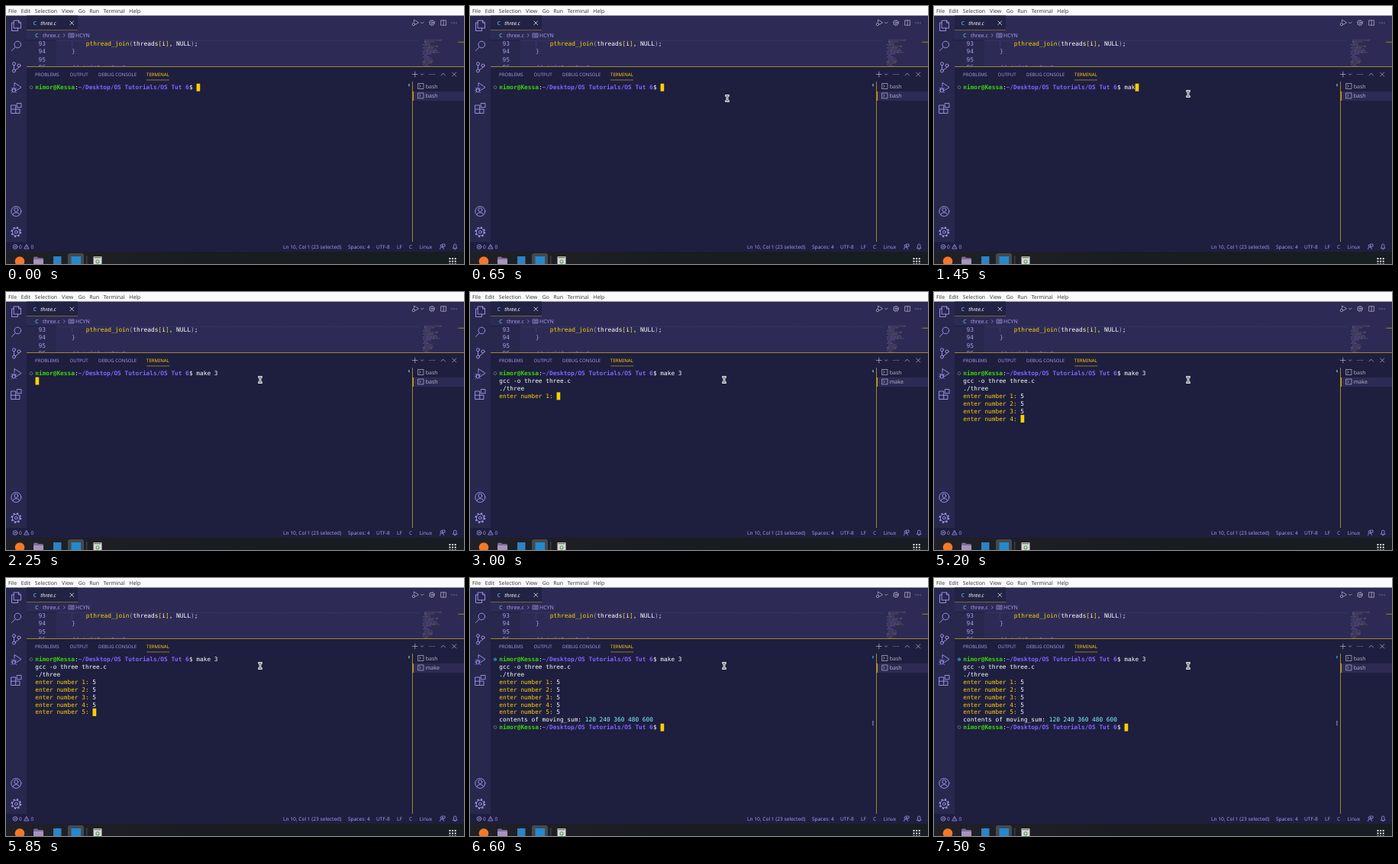
Write an HTML page that moves like this. It is 600 px wide and 338 px high and loops after 8000 ms.

```html
<!DOCTYPE html>
<html lang="en">
<head>
<meta charset="utf-8">
<title>Terminal session</title>
<style>
  html, body { margin: 0; width: 100%; height: 100%; overflow: hidden; background: #1e1e3f; }
  svg { display: block; width: 600px; height: 338px; }
  text { font: 6.6px "Noto Sans", "Open Sans", sans-serif; fill: #a599e9; white-space: pre; text-rendering: geometricPrecision; }
  .menu text { font-size: 6.9px; fill: #3c3c3c; }
  .tabs text { font-size: 6.1px; }
  .jobs text { font-size: 7px; fill: #b3aec4; }
  .mono text { font: 7.79px "DejaVu Sans Mono", monospace; fill: #fff; }
  .code text { font-size: 7.87px; }
  .mono .user { fill: #3ad900; font-weight: bold; }
  .mono .path { fill: #8066ff; font-weight: bold; }
  .mono .ask { fill: #fad000; }
  .mono .sum { fill: #80fcff; }
  .mono .soft { fill: #a599e9; }
  .mono .note { fill: #b362ff; }
  .icons { fill: none; stroke: #a599e9; stroke-width: .9; stroke-linejoin: round; stroke-linecap: round; }
  .small { stroke-width: .75; }
  .gray { stroke: #b3aec4; }
</style>
</head>
<body>
<svg viewBox="0 0 600 338" xmlns="http://www.w3.org/2000/svg">
  <defs>
    <linearGradient id="desk" x2="1" y2="0">
      <stop offset="0" stop-color="#202127"/><stop offset=".45" stop-color="#191c20"/><stop offset="1" stop-color="#171d20"/>
    </linearGradient>
    <linearGradient id="shade" x2="0" y2="1">
      <stop offset="0" stop-color="#15152d" stop-opacity=".5"/><stop offset="1" stop-color="#15152d" stop-opacity="0"/>
    </linearGradient>
    <clipPath id="editor"><path d="M27 44H600V79H27z"/></clipPath>
  </defs>

  <!-- window surfaces -->
  <path fill="#2d2b55" d="M27 12H600V79H27z"/>
  <path fill="#28284e" d="M0 12H27V309H0z"/>
  <path fill="#fafafa" d="M0 0H600V12.5H0z"/>
  <path fill="#222244" d="M27 12.5H94V32H27z"/>
  <path fill="#28284e" d="M27 44H66V79H27z"/>
  <path fill="#1e1e3f" d="M27 79H600V309H27z"/>
  <path fill="#1e1e3f" d="M0 309H600V322H0z"/>
  <path fill="url(#desk)" d="M0 322H600V338H0z"/>
  <path fill="#8d7a2c" d="M27 31.2H94V32H27z"/>

  <g class="menu" id="menu"></g>

  <!-- editor -->
  <g clip-path="url(#editor)">
    <path fill="#3a386b" d="M66 44H541V46H66z"/>
    <path fill="url(#shade)" d="M27 44H541V46H27z"/>
    <g class="mono code">
      <text class="soft" x="42.6" y="51.5">93</text>
      <text class="soft" x="42.6" y="62.4">94</text>
      <text class="soft" x="42.6" y="73.1">95</text>
      <text class="soft" x="42.6" y="83.4">96</text>
      <text x="104.8" y="51.5"><tspan class="ask">pthread_join</tspan><tspan class="soft">(</tspan>threads<tspan class="ask">[</tspan>i<tspan class="ask">]</tspan>, NULL<tspan class="soft">)</tspan>;</text>
      <text class="soft" x="86" y="62.4">}</text>
      <text class="note" x="86" y="83.4">// print output</text>
    </g>
    <path d="M86.5 46V54" stroke="#47447c" stroke-width=".5"/>
    <g id="map"></g>
    <path stroke="#a8922f" stroke-width=".9" d="M592.5 47.3H600"/>
  </g>
  <path fill="#9c882c" d="M27 79H600V80H27z"/>
  <text x="35.5" y="24.8" style="fill:#519aba;font-weight:bold;font-size:7px">C</text>
  <text x="45.3" y="24.8" style="fill:#fff;font-style:italic;font-size:6.8px">three.c</text>
  <text x="38" y="41.2" style="fill:#519aba;font-weight:bold;font-size:7px">C</text>
  <text x="48" y="41" style="font-size:7px">three.c</text>
  <text x="91" y="41" style="font-size:7px">HCYN</text>

  <!-- panel -->
  <g class="tabs" id="tabs"></g>
  <path fill="#c0a318" d="M184 96.6H214V97.3H184z"/>
  <path fill="#2d2b55" d="M533 112H600V124H533z"/>
  <path fill="#9c882c" d="M532 99H533V309H532z"/>
  <path fill="#c0a318" d="M533 112H534V124H533z"/>
  <g class="jobs">
    <text x="549.7" y="107.8">bash</text>
    <text id="job" x="549.7" y="120.3">bash</text>
  </g>

  <!-- activity bar -->
  <g class="icons">
    <path d="M10.5 19H16.5L19.5 22V29H10.5zM16.5 19V22H19.5M10.5 22H7.5V32.5H15.5V29"/>
    <circle cx="15.3" cy="50.5" r="4.3"/><path d="M12.2 53.7L7.5 58.6"/>
    <circle cx="10.5" cy="75.7" r="2"/><circle cx="17" cy="78" r="2"/><circle cx="10.5" cy="85" r="2"/>
    <path d="M10.5 77.8V83M17 80Q16.5 82 12.5 83.5"/>
    <path d="M11 105V100.5L20 106.5L14.5 110"/><ellipse cx="10.3" cy="110" rx="2.1" ry="3"/>
    <path class="small" d="M8.4 109H12.2M7 107.4L8.4 108.6M6.8 110.5H8.2M7 113.4L8.5 112.2M13.6 107.4L12.2 108.6M13.8 110.5H12.4M13.6 113.4L12.1 112.2"/>
    <path d="M7 130H12.7V140.5H7zM7 135.2H18V140.5H12.7M14.6 127.5H20V132.8H14.6z"/>
    <circle cx="13.3" cy="269" r="6.5"/><circle cx="13.3" cy="267" r="2.5"/><path d="M9 273.6Q9.5 270.5 13.3 270.5T17.6 273.6"/>
    <circle cx="13.3" cy="296" r="4.9"/><circle cx="13.3" cy="296" r="1.8"/>
    <circle cx="13.3" cy="296" r="6" stroke-width="1.8" stroke-dasharray="2.2 2.51" stroke-linecap="butt"/>
  </g>

  <!-- toolbar and panel icons -->
  <g class="icons small gray">
    <path d="M84 20L88.5 24.5M88.5 20L84 24.5" stroke="#fff"/>
    <path d="M534.5 21V18L540.5 21.8L536.8 24"/><circle cx="534" cy="24" r="1.7"/>
    <path d="M543.5 21.2L545.3 23L547.1 21.2"/>
    <circle cx="558" cy="22" r="3"/><circle cx="558" cy="22" r="1"/>
    <circle cx="558" cy="22" r="3.6" stroke-dasharray="1.2 1.63" stroke-linecap="butt"/>
    <path d="M570 18.8H576.5V25.2H570zM573.2 18.8V25.2"/>
    <path d="M584 22H584.1M587 22H587.1M590 22H590.1M555 89.5H555.1M558 89.5H558.1M561 89.5H561.1" stroke-width="1.2"/>
    <path d="M532.5 89.5H539M535.8 86.2V92.8M543.5 88.8L545.1 90.4L546.7 88.8M570 91L572.7 88L575.4 91M584.7 87L589.7 92M589.7 87L584.7 92"/>
    <path d="M540 101.5H547V108.5H540zM541.5 103.3L543.3 105L541.5 106.7M540 114H547V121H540zM541.5 115.8L543.3 117.5L541.5 119.2"/>
  </g>

  <!-- breadcrumb and status icons -->
  <g class="icons small">
    <path d="M75.5 36.7L77.2 38.5L75.5 40.3M82.5 36H89V41H82.5zM84 37.7H87.5M84 39.3H87.5"/>
    <circle cx="12" cy="315.4" r="2.9"/><path d="M10.8 314.2L13.2 316.6M13.2 314.2L10.8 316.6"/>
    <path d="M27 312.6L30 318H24zM27 314.5V316.2"/>
    <path d="M568.5 318.5Q568.5 315.8 571 315.8T573.4 318.5M571.5 312H575V315H573.6L572.4 316V315"/><circle cx="570.5" cy="314" r="1.4"/>
    <path d="M585.5 317.3H591L590 315.8V314Q590 312 588.2 312T586.5 314V315.8zM587.5 318.6H589"/>
  </g>
  <g id="status"></g>

  <!-- dock -->
  <rect x="81" y="324" width="21" height="16" rx="3" fill="#464950"/>
  <circle cx="18" cy="334.5" r="6.3" fill="#f4772b"/>
  <path fill="#7b6a99" d="M36 330Q36 328.5 37.5 328.5H41L42.5 330H47.5Q49 330 49 331.5V338H36z"/>
  <path fill="#a694bf" d="M36 332H49V338H36z"/>
  <rect x="62" y="328" width="10.5" height="12" fill="#2f83c5"/>
  <rect x="85.5" y="328" width="12.5" height="12" fill="#2489ca"/>
  <path fill="#60646a" d="M105.5 327H106.2V338H105.5z"/>
  <rect x="114.5" y="328" width="11" height="12" rx="1" fill="#d8dad6"/>
  <path fill="#74796f" d="M115.5 328.6H124.5V330.2H115.5z"/>
  <circle cx="120" cy="334.8" r="2" fill="none" stroke="#5a9c5b" stroke-width="1.1"/>
  <g id="grid" fill="#f1f1f1"></g>

  <!-- terminal -->
  <g class="mono" id="term"></g>
  <g fill="none" stroke-width=".8">
    <circle id="first" cx="33" cy="106.6" r="1.9"/>
    <circle id="second" cx="33" cy="195.5" r="1.9" stroke="#77778e"/>
  </g>
  <path id="mark" d="M527 102H529V105.2H527z"/>
  <path id="thumb" fill="#686783" d="M527 187H528.7V193.5H527z"/>
  <rect id="caret" width="4.7" height="10" fill="#fad000"/>
  <g id="pointer" fill="none" stroke-linecap="square">
    <path d="M-1.3 -3.6H1.3M0 -3.6V3.6M-1.3 3.6H1.3" stroke="#e6e6ea" stroke-width="2.9"/>
    <path d="M-1.2 -3.4H1.2M0 -3.4V3.4M-1.2 3.4H1.2" stroke="#55555f" stroke-width=".8"/>
  </g>
</svg>

<script>
const LOOP = 8000, CELL = 4.69, LEFT = 38.3, TOP = 109.2, ROW = 9.89;
const $ = id => document.getElementById(id);

function add(parent, tag, attrs, text = '') {
  const el = document.createElementNS('http://www.w3.org/2000/svg', tag);
  for (const key in attrs) el.setAttribute(key, attrs[key]);
  el.textContent = text;
  return parent.appendChild(el);
}

const labels = (id, y, items) => items.forEach(([x, s, fill]) =>
  add($(id), 'text', { x, y, style: fill ? `fill:${fill}` : '' }, s));

labels('menu', 9.3, [[3, 'File'], [19.7, 'Edit'], [37.8, 'Selection'], [73, 'View'],
  [94.7, 'Go'], [109.2, 'Run'], [127.5, 'Terminal'], [161.3, 'Help']]);
labels('tabs', 92, [[38, 'PROBLEMS'], [83.5, 'OUTPUT'], [121, 'DEBUG CONSOLE'], [184, 'TERMINAL', '#fad000']]);
labels('status', 317.7, [[17, '0'], [32.5, '0'], [363, 'Ln 10, Col 1 (23 selected)'], [448, 'Spaces: 4'],
  [485, 'UTF-8'], [512, 'LF'], [528, 'C'], [541.5, 'Linux']]);

// minimap: seeded runs of tiny code
let seed = 7;
const rand = () => (seed = seed * 16807 % 2147483647) / 2147483647;
const inks = ['#fad000', '#a599e9', '#9a8441', '#b362ff', '#8c86b8'];
for (let y = 44.5; y < 79; y += 2) {
  const wide = y < 46 || y > 52 && y < 61;
  let x = 546 + (rand() < .6 ? 2 : 0);
  const end = x + (wide ? 13 : 3) + rand() * 8;
  while (x < end) {
    const width = 1.5 + rand() * 3;
    add($('map'), 'rect', { x, y, width, height: .8, fill: inks[Math.floor(rand() * 5)], opacity: .5 });
    x += width + .6;
  }
}

for (let i = 0; i < 9; i++)
  add($('grid'), 'rect', { x: 580.5 + i % 3 * 3.6, y: 330 + Math.floor(i / 3) * 3.6, width: 2, height: 2, rx: .4 });

// terminal pieces, each shown from a given time
const pieces = [];
function put(at, row, col, text, style = '') {
  const el = add($('term'), 'text', { x: LEFT + col * CELL, y: TOP + row * ROW, class: style }, text);
  pieces.push({ at, el });
}
function prompt(at, row) {
  put(at, row, 0, 'nimor@Kessa', 'user');
  put(at, row, 11, ':');
  put(at, row, 12, '~/Desktop/OS Tutorials/OS Tut 6', 'path');
  put(at, row, 43, '$');
}

// caret stops: time, row, column
const stops = [[0, 0, 45]];
prompt(0, 0);
[['m', 1250], ['a', 1300], ['k', 1400], ['e', 1500], [' ', 1750], ['3', 1900]].forEach(([key, at], i) => {
  put(at, 0, 45 + i, key);
  stops.push([at, 0, 46 + i]);
});
put(2300, 1, 0, 'gcc -o three three.c');
stops.push([2250, 1, 0], [2300, 2, 0]);
put(2500, 2, 0, './three');
[[2500, 3450], [3650, 4000], [4450, 4750], [5000, 5300], [5650, 6000]].forEach(([ask, reply], i) => {
  put(ask, 3 + i, 0, `enter number ${i + 1}:`, 'ask');
  put(reply, 3 + i, 16, '5');
  stops.push([ask, 3 + i, 16], [reply, 3 + i, 17]);
});
put(6250, 8, 0, 'contents of moving_sum:');
put(6250, 8, 24, '120 240 360 480 600', 'sum');
prompt(6300, 9);
stops.push([6250, 9, 0], [6300, 9, 45]);

// pointer stops: time, x, y
const path = [[50, 400, 345], [650, 337, 121], [850, 337, 121], [1000, 333, 115]];
function pointerAt(t) {
  t = Math.floor(t / 50) * 50;
  const i = path.findIndex(p => p[0] > t);
  if (i === 0) return [path[0][1], 350];
  if (i < 0) return path[path.length - 1].slice(1);
  const [a, b] = [path[i - 1], path[i]];
  const k = 1 - (1 - (t - a[0]) / (b[0] - a[0])) ** 2;
  return [a[1] + (b[1] - a[1]) * k, a[2] + (b[2] - a[2]) * k];
}

const show = (el, on) => el.setAttribute('visibility', on ? 'visible' : 'hidden');

function draw(t) {
  pieces.forEach(p => show(p.el, t >= p.at));
  const [, row, col] = stops.filter(s => s[0] <= t).pop();
  $('caret').setAttribute('x', LEFT + .2 + col * CELL);
  $('caret').setAttribute('y', 101.7 + row * ROW);

  const done = t >= 6300;
  $('job').textContent = t >= 2550 && t < 6600 ? 'make' : 'bash';
  $('first').setAttribute('fill', done ? '#1b81a8' : 'none');
  $('first').setAttribute('stroke', done ? '#1b81a8' : '#77778e');
  $('mark').setAttribute('fill', done ? '#1b81a8' : '#77778e');
  show($('second'), done);
  show($('thumb'), done);
  $('pointer').setAttribute('transform', `translate(${pointerAt(t)})`);
}

const start = performance.now();
function tick() {
  draw((performance.now() - start) % LOOP);
  requestAnimationFrame(tick);
}
tick();
</script>
</body>
</html>
```
